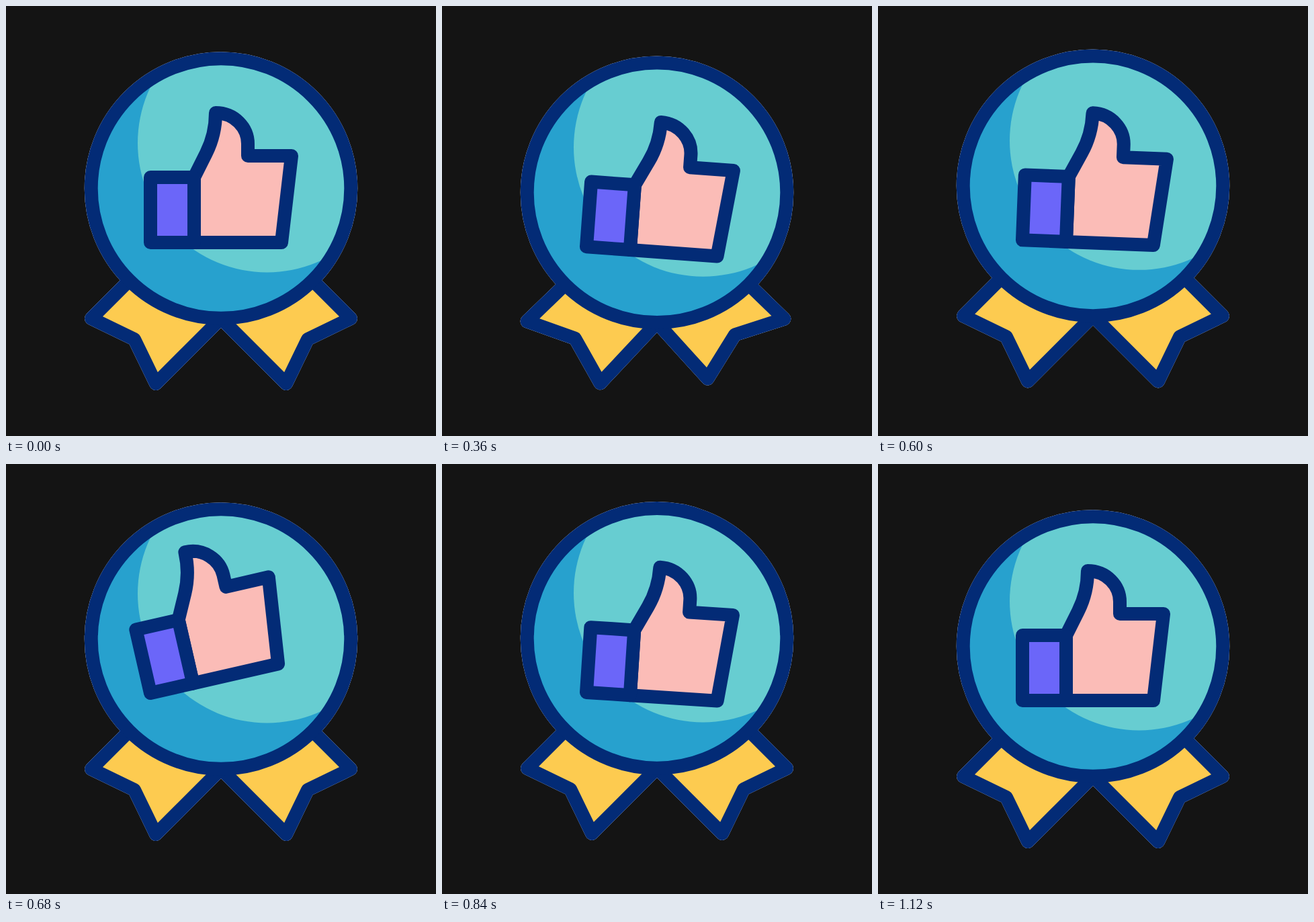
Write an HTML page that moves like this. It is 640x640 px and loops after 1480 ms.

```html
<!DOCTYPE html>
<html lang="en">
<head>
<meta charset="utf-8">
<title>Thumbs-up badge</title>
<style>
  html, body { margin: 0; width: 100%; height: 100%; overflow: hidden; background: #141414; }
  svg { display: block; width: 100vw; height: 100vh; }
  #badge { filter: drop-shadow(0 0 .5px #fff); }
  .line { stroke: #032b76; stroke-width: 20; stroke-linejoin: round; }
</style>
</head>
<body>
<svg viewBox="0 0 640 640">
  <clipPath id="disc"><circle cx="320" cy="271.5" r="193"/></clipPath>
  <g id="badge">
    <path id="left" class="line" fill="#fdcb50"/>
    <path id="right" class="line" fill="#fdcb50" transform="matrix(-1 0 0 1 640 0)"/>
    <circle cx="320" cy="271.5" r="193" fill="#27a1ce"/>
    <circle cx="388.5" cy="204" r="192.5" fill="#67cdd1" clip-path="url(#disc)"/>
    <circle class="line" cx="320" cy="271.5" r="193.3" fill="none"/>
    <g id="thumb" class="line">
      <path fill="#fbbcb7" d="M280 255L298 219C309 197 312 178 312 159C340 159 360 181 360 205V223H425L410 352H280Z"/>
      <path fill="#6b66f9" d="M215 255H280V352H215Z"/>
    </g>
  </g>
</svg>
<script>
const LOOP = 1480, STEP = 40;
const $ = id => document.getElementById(id);

// Eases through [time, value] turning points and holds the end values.
function swing(t, ...keys) {
  const next = keys.findIndex(key => key[0] > t);
  if (next === 0) return keys[0][1];
  if (next < 0) return keys.at(-1)[1];
  const [t0, v0] = keys[next - 1], [t1, v1] = keys[next];
  const u = (t - t0) / (t1 - t0);
  return v0 + (v1 - v0) * u * u * (3 - 2 * u);
}

// Tip, notch and lower corner of a ribbon in its three poses.
const rest = [127, 465, 191, 496, 223, 562];
const folded = [139, 453, 213, 475, 257, 538];
const flared = [114, 473, 183, 502, 214, 572];

function drawRibbon(side, t, peak, depth) {
  const fold = swing(t, [80, 0], [peak, depth], [450, 0]);
  const flare = swing(t, [peak, 0], [450, 1], [520, 0]);
  const corners = rest.map((p, i) => p + fold * (folded[i] - p) + flare * (flared[i] - p));
  $(side).setAttribute("d", `M197 395L${corners.join(" ")} 320 465Z`);
}

function draw(t) {
  const bob = swing(t, [80, 0], [440, 7.2], [755, -14], [1120, 0]);
  const tilt = swing(t, [280, 0], [520, 16.2], [685, -13], [870, 5], [1080, 0]);
  drawRibbon("left", t, 270, 1);
  drawRibbon("right", t, 290, 1.25);
  $("badge").setAttribute("transform", `translate(0 ${bob})`);
  $("thumb").setAttribute("transform", `rotate(${tilt} 215 352)`);
}

const start = performance.now();
function tick() {
  const t = (performance.now() - start) % LOOP;
  draw(Math.floor(t / STEP) * STEP);
  requestAnimationFrame(tick);
}
tick();
</script>
</body>
</html>
```
